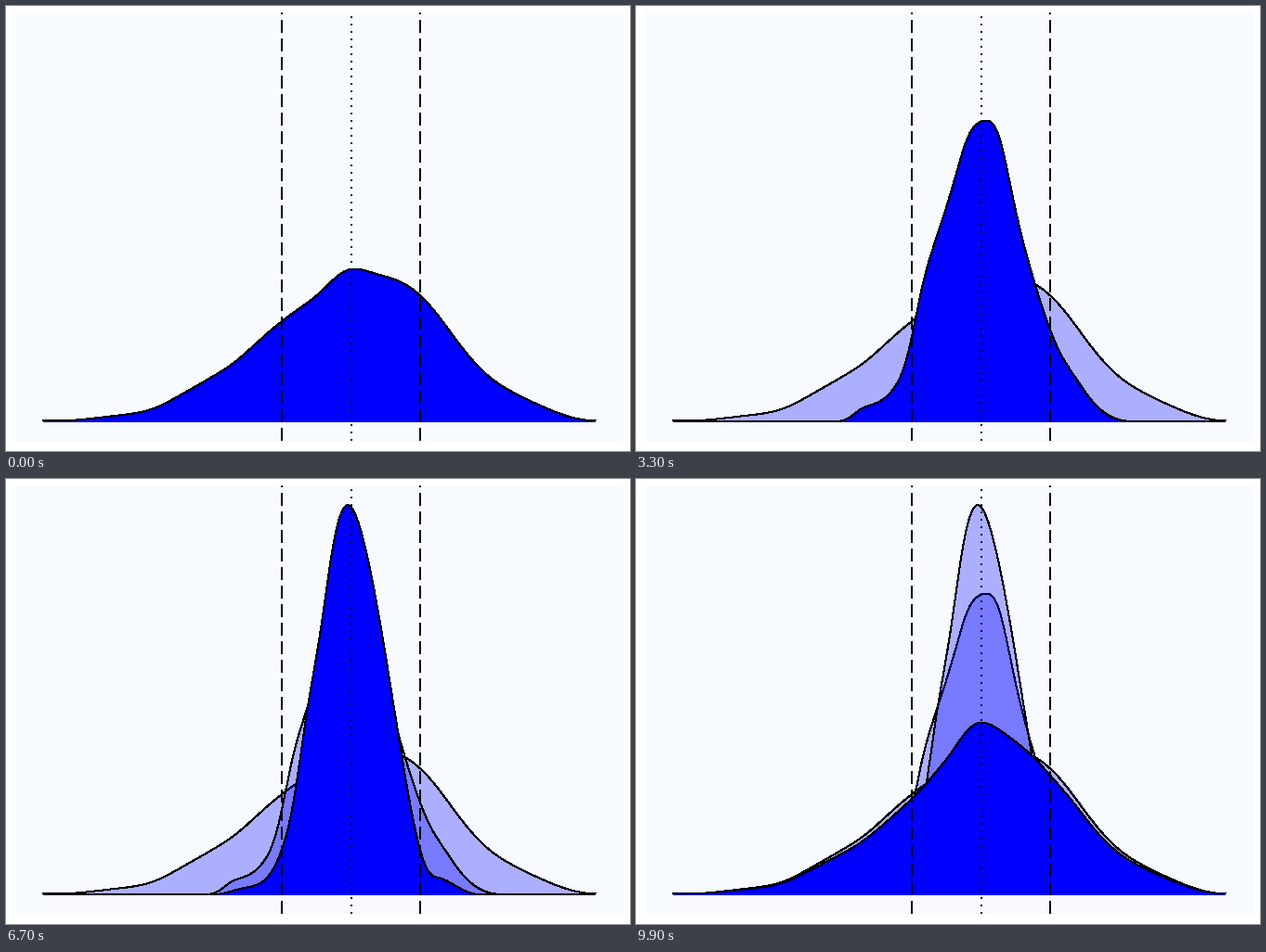
A matplotlib script that plays this animation: 672x480 px, repeating every 10000 ms.

```python
import numpy as np
import matplotlib.pyplot as plt
from matplotlib.animation import FuncAnimation

W, H, DPI = 672, 480, 96
PX = 72 / DPI                 # one pixel in points
BASE = 448.02                 # zero density, just inside its pixel row
LEFT, RIGHT = 40, 635
STEPS = 12                    # frames per morph
STARTS = (22, 56, 89)         # first frame of each morph

xs = np.linspace(LEFT, RIGHT, 2 * (RIGHT - LEFT) + 1)


def density(x0, x1, *knots):
    """Cubic spline over evenly spaced heights, flat at both ends, 0 outside."""
    h = np.array(knots, float)
    n = len(h)
    system = 4 * np.eye(n) + np.eye(n, k=1) + np.eye(n, k=-1)
    rhs = np.zeros(n)
    rhs[1:-1] = 3 * (h[2:] - h[:-2])
    system[0], system[-1] = np.eye(n)[0], np.eye(n)[-1]
    m = np.linalg.solve(system, rhs)

    u = (xs - x0) / (x1 - x0) * (n - 1)
    i = np.clip(u.astype(int), 0, n - 2)
    t = u - i
    y = (h[i] * (1 + 2 * t) * (1 - t) ** 2 + m[i] * t * (1 - t) ** 2
         + h[i + 1] * t * t * (3 - 2 * t) + m[i + 1] * t * t * (t - 1))
    return np.where((xs < x0) | (xs > x1), 0, np.maximum(y, 0))


wide = density(LEFT, RIGHT, 0.6, 1.1, 4, 7.4, 14, 29, 46, 65.5, 92, 116, 138.5,
               163, 159.6, 149.5, 125, 86, 52, 31.5, 17, 5.5, 0.8)
middle = density(210, 538, 0, 2.3, 13.6, 20, 33, 70, 146, 202, 254.5, 307, 324,
                 309, 237, 170.5, 117, 75.5, 48.5, 25, 9, 1.5, 0)
narrow = density(223, 511, 0, 1.9, 6, 9, 17.5, 43, 99, 195, 281, 378, 419.6,
                 395, 332, 249, 159, 78, 27.5, 17.4, 10.4, 2.8, 0)
curves = [wide, middle, narrow]


class Area:
    """Filled density with a crisp one-pixel upper outline."""

    def __init__(self, ax, z, alpha):
        self.fill, = ax.fill([0, 0], [0, 0], color="#0000ff", alpha=alpha,
                             lw=0, aa=False, zorder=z)
        self.line, = ax.plot([], [], color="black", lw=PX, aa=False,
                             snap=False, solid_capstyle="butt",
                             zorder=z + 0.5)

    def set_heights(self, h):
        top = np.column_stack([xs, BASE - h])
        self.fill.set_xy(np.vstack([top, [RIGHT, BASE], [LEFT, BASE]]))
        self.line.set_data(*top.T)

    def show(self, on):
        self.fill.set_visible(on)
        self.line.set_visible(on)


fig = plt.figure(figsize=(W / DPI, H / DPI), dpi=DPI, facecolor="white")
ax = fig.add_axes([0, 0, 1, 1])
ax.set_xlim(0, W)
ax.set_ylim(H, 0)
ax.axis("off")
ax.add_patch(plt.Rectangle((10, 7), 655, 463, color="#f7fbff", lw=0,
                           aa=False, zorder=0))

shadows = [Area(ax, z + 1, 0.3) for z in range(3)]
for shadow, curve in zip(shadows, curves):
    shadow.set_heights(curve)
current = Area(ax, 5, 1)

# dash lengths are multiples of the line width
for x, dash in ((297, (7, 3)), (372, (1, 3)), (446, (7, 3))):
    ax.plot([x, x], [469, 7], color="black", lw=2 * PX, ls=(0, dash),
            dash_capstyle="butt", snap=False, zorder=10)


def draw(i):
    h = wide
    for n, start in enumerate(STARTS):
        shadows[n].show(i >= start)
        if i >= start:
            t = min((i - start + 1) / STEPS, 1)
            h = (1 - t) * curves[n] + t * curves[(n + 1) % 3]
    current.set_heights(h)
    return []


anim = FuncAnimation(fig, draw, frames=100, interval=100, repeat=True,
                     repeat_delay=0)
plt.show()
```
